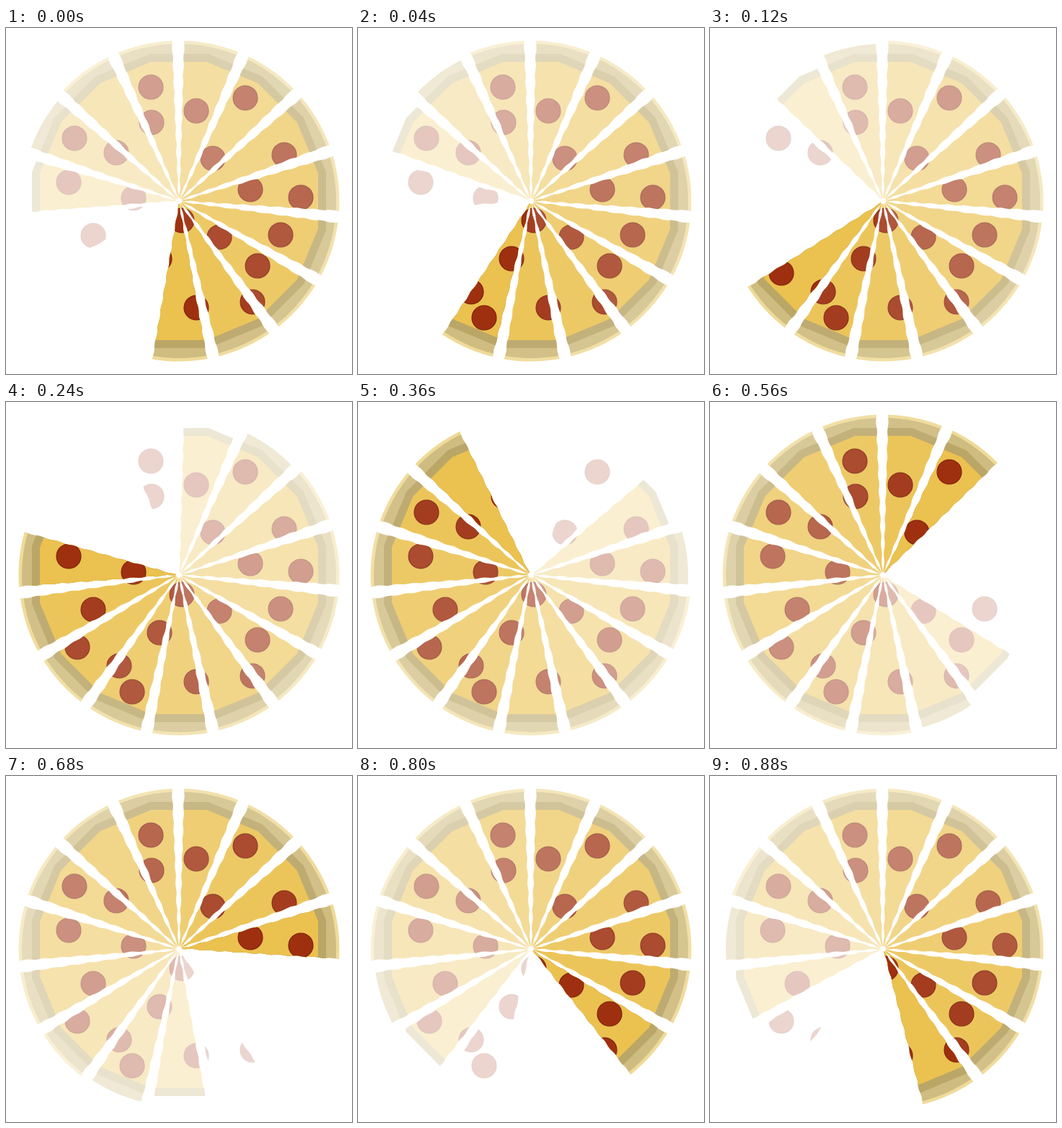
Recreate the animation shown at these times as an HTML page. Size 480 by 480 pixels, loop 960 ms.

```html
<!DOCTYPE html>
<html lang="en">
<head>
<meta charset="utf-8">
<title>Pizza spinner</title>
<style>
  html, body { margin: 0; width: 100%; height: 100%; overflow: hidden; background: #fff; }
  svg { display: block; width: 100vw; height: 100vh; }
  .topping { fill: #9e3010; stroke: #84260c; stroke-width: 1.4px; }
</style>
</head>
<body>
<svg id="pizza" viewBox="0 0 480 480"></svg>
<script>
const SLICES = 15, STEP = 360 / SLICES, LOOP = 960, TICK = 40;
const C = 240, FIRST = 7;
// Scattered by hand, clockwise from the top.
const TOPPINGS = [
  [264, 115], [332, 97], [287, 181], [386, 176], [339, 224], [409, 235],
  [381, 287], [349, 330], [296, 290], [342, 380], [264, 388], [244, 267],
  [213, 320], [175, 402], [157, 366], [99, 340], [121, 288], [177, 236],
  [87, 214], [95, 153], [153, 173], [202, 131], [201, 82]
];
const svg = document.getElementById('pizza');

function add(parent, tag, attrs) {
  const el = document.createElementNS('http://www.w3.org/2000/svg', tag);
  for (const key in attrs) el.setAttribute(key, attrs[key]);
  parent.appendChild(el);
  return el;
}

// Angles run clockwise from the top; side shifts the point across the ray.
function polar(deg, r, side = 0) {
  const a = deg * Math.PI / 180, s = Math.sin(a), c = Math.cos(a);
  return [C + r * s + side * c, C - r * c + side * s].map(v => v.toFixed(2)).join();
}

// Half the width of a cut: a widening gap with a slightly ragged edge.
function cut(r) {
  return 0.7 + 0.035 * r - 0.6 * Math.sin(r * 0.26);
}

function wedge(i) {
  const from = i * STEP - 0.3, to = from + STEP, left = [], right = [];
  for (let r = 4; r <= 240; r += 4) {
    left.push(polar(from, r, cut(r)));
    right.unshift(polar(to, r, -cut(r)));
  }
  return left.concat(right).join(' ');
}

function facets(apothem) {
  const r = apothem / Math.cos(Math.PI / 16);
  return Array.from({ length: 16 }, (_, k) => polar((k + 0.5) * 22.5, r)).join(' ');
}

function makeSlice(i) {
  add(add(svg, 'clipPath', { id: 'cut' + i }), 'polygon', { points: wedge(i) });
  const group = add(svg, 'g', { 'clip-path': `url(#cut${i})` });
  const disc = (r, fill) => add(group, 'circle', { cx: C, cy: C, r, fill });
  const poly = (r, fill) => add(group, 'polygon', { points: facets(r), fill });
  // From the rim inward; the rim drops out first.
  const layers = [
    disc(222.5, '#efda98'),
    disc(218, '#cfbc80'),
    poly(204, '#baa667'),
    poly(193, '#ebc14f')
  ];
  for (const [cx, cy] of TOPPINGS) add(group, 'circle', { class: 'topping', cx, cy, r: 16.9 });
  return { group, layers };
}

const slices = Array.from({ length: SLICES }, (_, i) => makeSlice(i));
let shown = -1;

function draw(now) {
  // The fifteen states snap to a 40 ms clock.
  const tick = Math.floor((now % LOOP) / TICK);
  const state = Math.ceil((tick + 1) * TICK * SLICES / LOOP) - 1;
  if (state === shown) return;
  shown = state;
  slices.forEach(({ group, layers }, i) => {
    const age = (FIRST + state - i + SLICES) % SLICES;
    group.setAttribute('opacity', age > 12 ? 0 : 1 - age / SLICES);
    layers.forEach((el, depth) => {
      const end = Math.min(10 + depth, 12);
      el.setAttribute('visibility', age < end ? 'visible' : 'hidden');
    });
  });
}

function loop() {
  draw(performance.now());
  requestAnimationFrame(loop);
}
draw(0);
requestAnimationFrame(loop);
</script>
</body>
</html>
```
